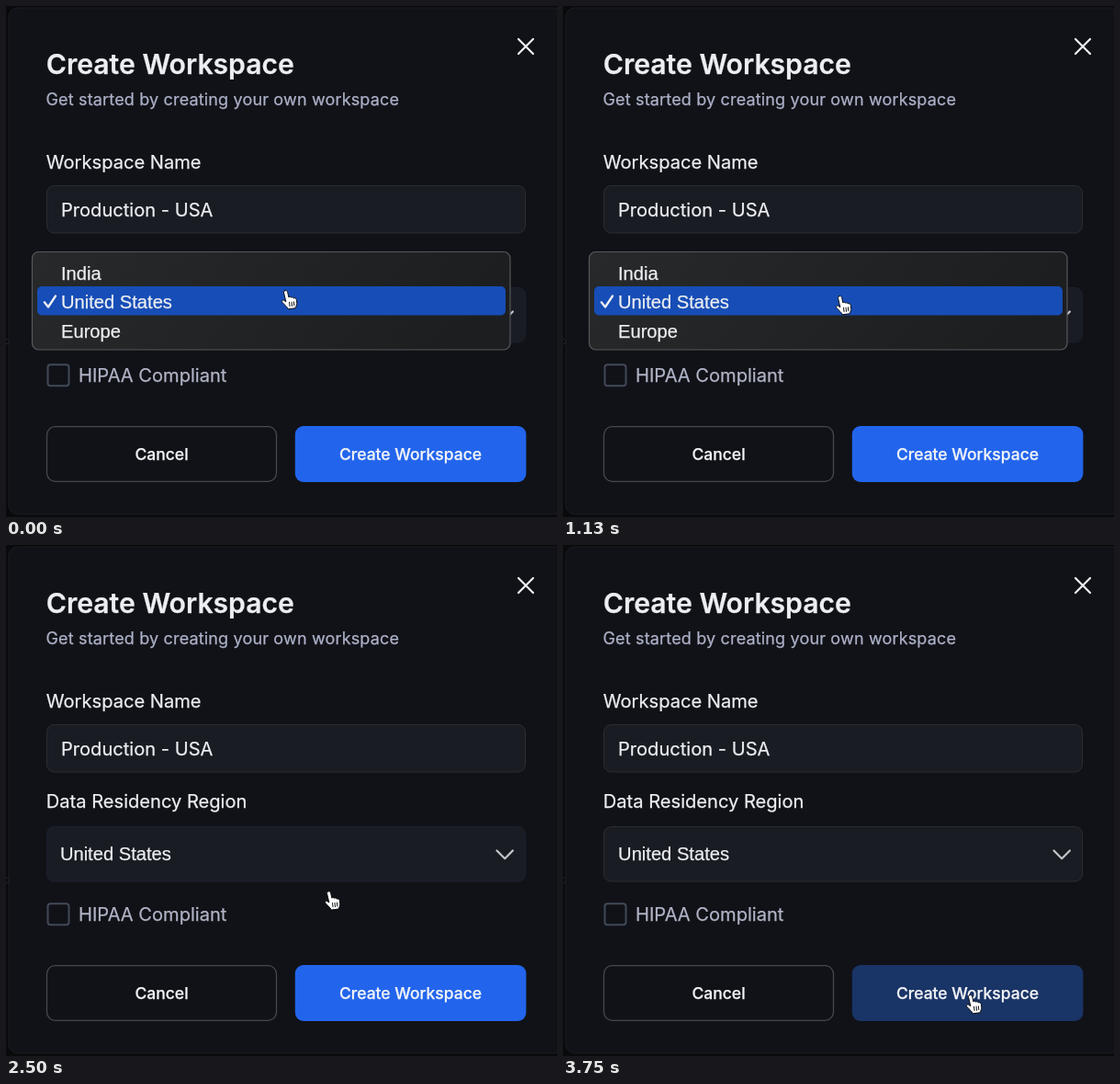
These frames come from a looping animation (600x556 px, 3.88 s). An HTML page:

```html
<!DOCTYPE html>
<html lang="en">
<head>
<meta charset="utf-8">
<title>Create Workspace</title>
<style>
  html, body { margin: 0; width: 100%; height: 100%; overflow: hidden; background: #090a0c; }
  svg { display: block; width: 600px; height: 556px; }
  text {
    font: 20.1px Inter, sans-serif; font-optical-sizing: none; white-space: pre;
    color: #eceef1; fill: currentColor; stroke: currentColor; stroke-width: .25px;
  }
  .title { font-size: 30.15px; font-weight: 600; }
  .sub { font-size: 18px; letter-spacing: .16px; color: #adb1c8; }
  .muted { color: #b0b4c6; }
  .button { font-size: 17.5px; font-weight: 500; text-anchor: middle; color: #f4f5f8; }
  .native { font: 20.15px "Liberation Sans", Arial, sans-serif; }
  .line { fill: none; stroke-linecap: round; stroke-linejoin: round; }
</style>
</head>
<body>
<svg viewBox="0 0 600 556">
  <defs>
    <linearGradient id="glass" x2="1" y2=".15">
      <stop offset="0" stop-color="#27292b"/>
      <stop offset=".45" stop-color="#222426"/>
      <stop offset="1" stop-color="#1c1e20"/>
    </linearGradient>
  </defs>

  <!-- Dialog -->
  <circle class="line" cx="0" cy="365" r="3" stroke="#25272b"/>
  <rect x="3" y="2" width="604" height="551" rx="10" fill="#111217" stroke="#1b1d21"/>
  <path class="line" d="M558 36l16 16m0-16l-16 16" stroke="#eeeff1" stroke-width="2.2"/>
  <text class="title" x="43.7" y="74">Create Workspace</text>
  <text class="sub" x="43.5" y="108">Get started by creating your own workspace</text>

  <text x="43.8" y="177">Workspace Name</text>
  <rect x="44.5" y="195.5" width="521" height="51.5" rx="8" fill="#191c23" stroke="#2a2d33"/>
  <text x="60" y="229">Production - USA</text>

  <text x="43.8" y="285.5">Data Residency Region</text>
  <rect id="select" x="44.5" y="306.5" width="521" height="59.5" rx="8" fill="#191c23"/>
  <text id="value" class="native" y="343">United States</text>
  <path class="line" d="M534.5 332.5l8.7 8.7 8.7-8.7" stroke="#c3c5ca" stroke-width="2.2"/>

  <rect x="45.5" y="390.2" width="23" height="23" rx="3" fill="none" stroke="#414959" stroke-width="2"/>
  <text class="muted" x="79" y="409">HIPAA Compliant</text>

  <rect x="44.5" y="457.7" width="250" height="59.6" rx="9" fill="none" stroke="#45484d" stroke-width="1.3"/>
  <text class="button" x="169.5" y="494.3">Cancel</text>
  <rect id="create" x="314.8" y="457" width="251.6" height="61" rx="9"/>
  <text class="button" x="440.5" y="494.3">Create Workspace</text>

  <!-- Open menu -->
  <g id="menu">
    <rect x="28.5" y="267.5" width="520.5" height="106.5" rx="7" fill="url(#glass)" stroke="#56585b" stroke-width="1.2"/>
    <rect id="bar" x="34" width="510" height="31.5" rx="5" fill="#174db6"/>
    <path class="line" d="M41.8 322.3l4.2 5.2 8-12" stroke="#f0f1f3" stroke-width="2.3"/>
    <text class="native" x="60" y="297.8">India</text>
    <text class="native" x="60" y="329.3">United States</text>
    <text class="native" x="60" y="360.7">Europe</text>
  </g>

  <!-- Pointing hand -->
  <g id="hand" class="line" stroke="#08090b" stroke-width=".9">
    <path fill="#fff" d="M4.2 1.2C5.6.6 6.6 1.6 6.9 3L8 8C8.6 7.2 10 7.2 10.6 8.2 11.4 7.5 12.7 7.8 13 8.9 14 8.4 15.6 8.8 15.9 10.4L16.3 14C16.4 16 15.2 17 15 19L7.5 20C6.8 18 4 16 1.6 13.2.4 11.8 1.6 10.6 3 11L5.2 12.5 3 3.2C2.8 2.2 3.2 1.5 4.2 1.2Z"/>
    <path d="M8.6 13l.5 4M11 12.8l.4 4M13.2 12.6l.3 3.6"/>
  </g>
</svg>
<script>
const LOOP = 3880, STEP = 125, LAST = 30;
const BLINK = 15, FADE = 17, HOVER = 21, PRESS = 29;

// Moves of the hand: first step, last step, start, end
const moves = [
  [0, 2, [300, 309], [297, 296]],
  [7, 9, [297, 296], [297, 315]],
  [18, 23, [297, 315], [439, 489]]
];
const $ = id => document.getElementById(id);
const set = (id, name, value) => $(id).setAttribute(name, value);

function handAt(step) {
  const [from, to, a, b] = moves.findLast(move => step >= move[0]);
  const k = Math.min(1, (step - from) / (to - from));
  const ease = k * k * (3 - 2 * k);
  return a.map((v, i) => v + (b[i] - v) * ease);
}

function buttonColor(step) {
  if (step < HOVER) return '#2265ec';
  if (step === HOVER) return '#3c7bf7';
  if (step < PRESS) return '#548dfe';
  return step === PRESS ? '#3560b2' : '#193466';
}

function draw(now) {
  const step = Math.min(LAST, Math.floor(now % LOOP / STEP));
  const [x, y] = handAt(step);
  const focused = step < PRESS;
  set('hand', 'transform', `translate(${x - .7} ${y - .6}) scale(1.07)`);
  set('menu', 'opacity', step < FADE ? 1 : step === FADE ? .4 : 0);
  set('bar', 'y', y < 304 ? 273.5 : 305);
  set('bar', 'opacity', step === BLINK ? 0 : 1);
  set('select', 'stroke', focused ? '#1a2030' : '#2a2d33');
  set('value', 'x', focused ? 58.9 : 60.1);
  set('create', 'fill', buttonColor(step));
}

const start = performance.now();
function tick() {
  draw(performance.now() - start);
  requestAnimationFrame(tick);
}
tick();
</script>
</body>
</html>
```
